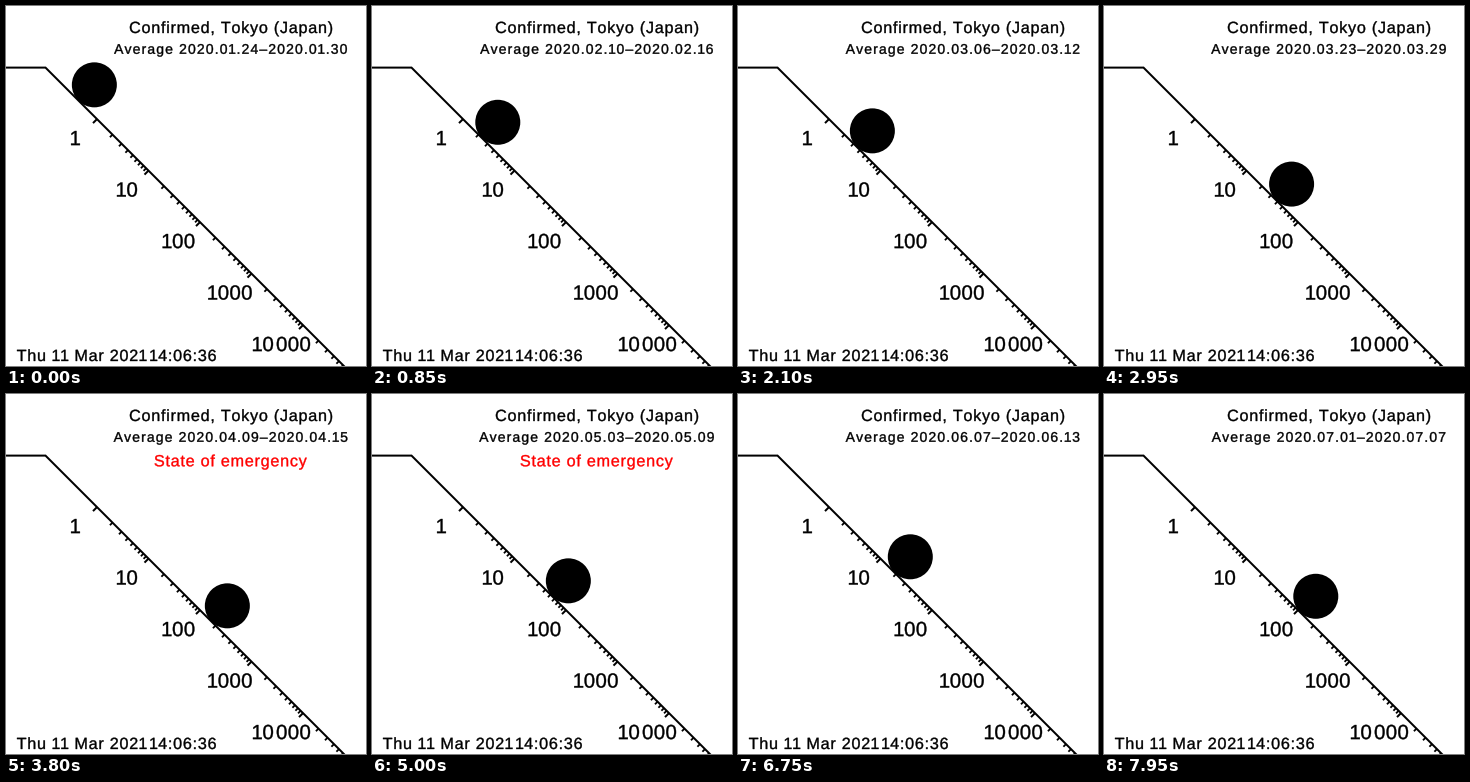
Write a matplotlib script that moves like this. It is 360 px wide and 360 px high and loops after 8 s.

```python
import numpy as np
import matplotlib.pyplot as plt
from matplotlib.animation import FuncAnimation
from matplotlib.patches import Circle, PathPatch
from matplotlib.path import Path
from matplotlib.textpath import TextPath

SIZE, FRAMES, STEP_MS = 360, 160, 50
CORNER = np.array([39.5, 61.6])     # where the flat part meets the slope (value 0.1)
DECADE = 51.5                       # pixels per power of ten, on both axes
RADIUS = 22.5
REST = (28, 38.8)                   # ball position while the average is zero
QUIET = 7, 13                       # first and last day at zero
FIRST_DAY = np.datetime64("2020-01-24")
ALERT = np.datetime64("2020-04-07"), np.datetime64("2020-05-25")
FONT = {"family": "Liberation Sans"}

# Turning points of the curve: day, seven-day total
turns = np.array([
    (0, 3), (2, 1), (14, 1), (17, 16), (22, 22), (24, 10), (32, 7),
    (37, 27), (41, 29), (43, 19), (46, 26), (50, 52), (52, 48), (58, 227),
    (68, 688), (75, 1169), (84, 982), (90, 690), (98, 614), (102, 229),
    (114, 41), (122, 85), (130, 147), (135, 128), (138, 211), (144, 222),
    (150, 334), (159, 748)])


def slope_pos(value):
    """Distance along x (and y) from the corner for a value."""
    return DECADE * (np.log10(value) + 1)


def ball_center(day):
    if QUIET[0] <= day <= QUIET[1]:
        return REST
    t = np.interp(day, turns[:, 0], slope_pos(turns[:, 1] / 7))
    return 55.8 + t, 46.3 + t


glyphs = {}


def em_width(s):
    return TextPath((0, 0), s, size=100, prop=FONT).get_extents().width / 100


def glyph(c):
    """Outline and advance of one character, in em units."""
    if c not in glyphs:
        p = TextPath((0, 0), c, size=100, prop=FONT)
        advance = em_width(f"|{c}|") - em_width("||")
        shift = 0
        if c == "1":                # proportional figure one
            advance -= 0.07
            shift = -0.035
        glyphs[c] = p.vertices / 100 + [shift, 0], p.codes, advance
    return glyphs[c]


def text_path(s, x, base, size, track=0.045, center=True):
    verts, codes, pen = [], [], 0
    for i, c in enumerate(s):
        v, k, advance = glyph(c)
        if c != " ":
            verts.append(v + [pen, 0])
            codes.append(k)
        elif s[i - 1].isdigit() and s[i + 1].isdigit():
            advance -= 0.2          # thin space between figures
        pen += advance + track
    path = Path(np.concatenate(verts) * [size, -size], np.concatenate(codes))
    box = path.get_extents()
    left = (box.x0 + box.x1) / 2 if center else box.x0
    return Path(path.vertices + [x - left, base], path.codes)


def add_text(*args, color="black", **kw):
    patch = PathPatch(text_path(*args, **kw), fc=color, ec=color, lw=0.35)
    ax.add_patch(patch)
    return patch


fig = plt.figure(figsize=(SIZE / 72, SIZE / 72), dpi=72, facecolor="white")
ax = fig.add_axes([0, 0, 1, 1])
ax.set_xlim(0, SIZE)
ax.set_ylim(SIZE, 0)
ax.axis("off")

# Ramp and logarithmic ticks
ax.plot([-5, CORNER[0], CORNER[0] + 320], [CORNER[1], CORNER[1], CORNER[1] + 320],
        color="black", lw=2, solid_joinstyle="miter")
for power in range(5):
    for n in range(1, 10):
        x, y = CORNER + slope_pos(n * 10.0 ** power)
        d, lw = (4, 2) if n == 1 else (2.6, 1.8)
        ax.plot([x, x - d], [y, y + d], color="black", lw=lw,
                solid_capstyle="butt")
    x, y = CORNER + slope_pos(10.0 ** power)
    label = "10 000" if power == 4 else str(10 ** power)
    add_text(label, x - 21.5, y + 26, 20.5, track=0.015)

add_text("Confirmed, Tokyo (Japan)", 225, 27, 16.2)
add_text("Thu 11 Mar 2021 14:06:36", 11, 355, 16.2, center=False)
alert = add_text("State of emergency", 224.7, 72.3, 16.2, color="red")
span = add_text("Average", 224.5, 47.8, 14)
ball = ax.add_patch(Circle(REST, RADIUS, fc="black", lw=0))


def dotted(day):
    return str(day).replace("-", ".")


def draw(i):
    first = FIRST_DAY + i
    last = first + 6
    line = f"Average {dotted(first)}\u2013{dotted(last)}"
    span.set_path(text_path(line, 224.5, 47.8, 14, track=0.08))
    alert.set_visible(bool(ALERT[0] <= last <= ALERT[1]))
    ball.center = ball_center(i)
    return span, alert, ball


anim = FuncAnimation(fig, draw, frames=FRAMES, interval=STEP_MS, repeat=True)
plt.show()
```
